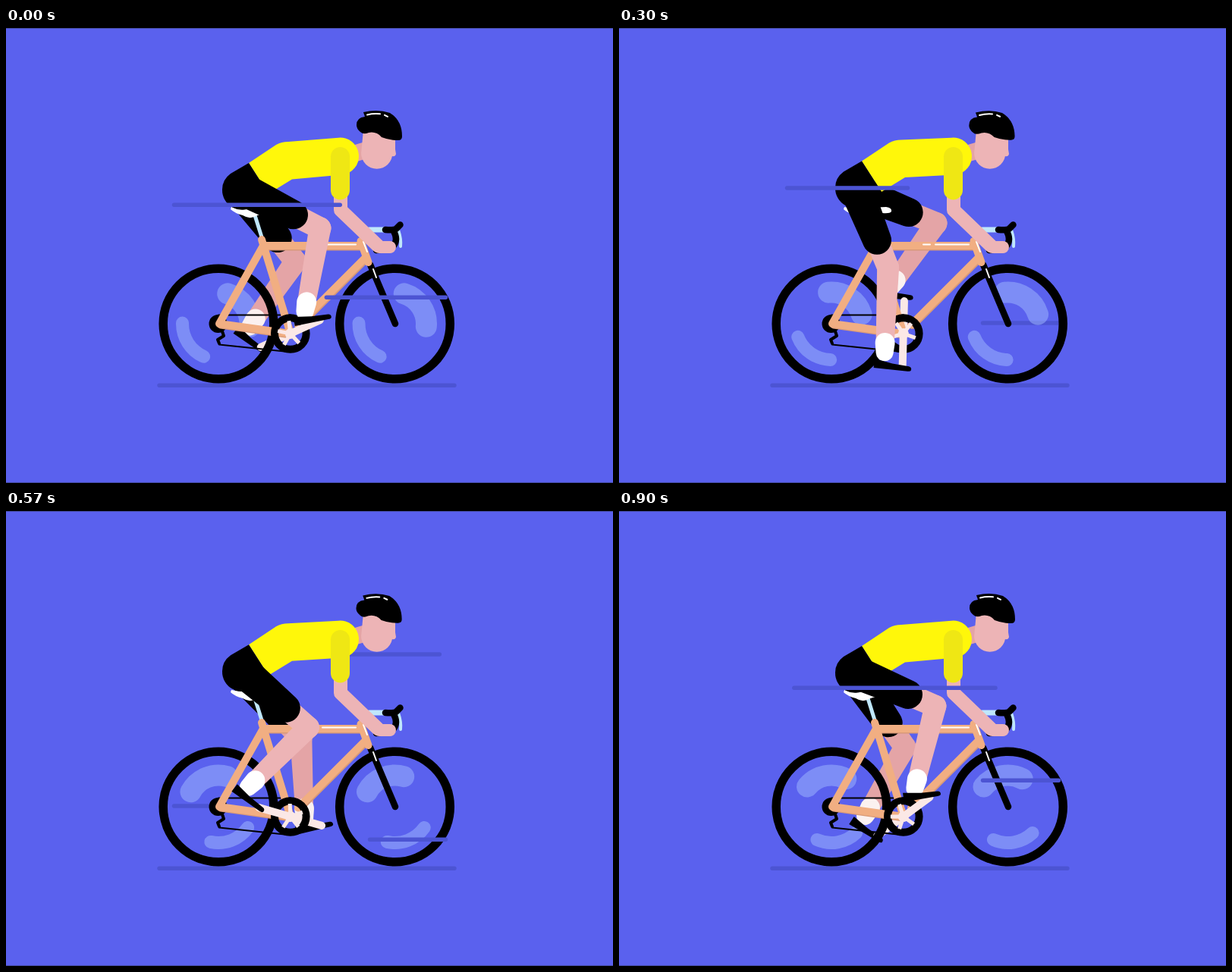
These frames come from a looping animation (800x600 px, 0.93 s). An HTML page:

```html
<!DOCTYPE html>
<html lang="en">
<head>
<meta charset="utf-8">
<title>Cyclist</title>
<style>
html, body { margin: 0; width: 100%; height: 100%; overflow: hidden; background: #5a61ee; }
svg { display: block; width: 800px; height: 600px; }
.ln { fill: none; stroke-linecap: round; stroke-linejoin: round; }
.skin { fill: #edb4b6; }
.far .skin { fill: #e4a4a6; }
.sock { fill: #fff; }
.far .sock { fill: #fbf1f0; }
.wind { stroke: #4c54d3; stroke-width: 5.4; }
.crank { stroke: #fbe8e6; stroke-width: 10; }
.tube { stroke: #f1ae82; stroke-width: 10; }
.shade { stroke: #d99a78; stroke-width: 10; }
.pale { stroke: #bfe7fb; }
.white { stroke: #fff; stroke-width: 2; }
.black { stroke: #000; }
.shine { stroke: #a0b9ff; stroke-opacity: .5; }
</style>
</head>
<body>
<svg viewBox="0 0 800 600">
  <rect width="800" height="600" fill="#5a61ee"/>
  <path d="M0 .5H800M0 599.5H800" stroke="#424a9e"/>
  <path class="ln wind" d="M202 471.3H591"/>
  <g id="back"></g>
  <g id="shines"></g>
  <g id="farLeg" class="far"></g>
  <path id="farCrank" class="ln crank"/>

  <g class="ln black">
    <circle cx="280" cy="390" r="72.8" stroke-width="11.5"/>
    <circle cx="512.5" cy="390" r="72.8" stroke-width="11.5"/>
    <path d="M280 378.5H375M281 417.5L372 427" stroke-width="2"/>
    <path d="M284 397L287 406L279 411L281 416" stroke-width="4"/>
    <path d="M480 312L513 390" stroke-width="8.5"/>
  </g>
  <circle cx="279.5" cy="390" r="12"/>
  <path class="ln white" d="M484 318L488 329"/>

  <path class="ln pale" d="M328 247L338 279" stroke-width="5"/>
  <path d="M297 236Q314 240 330 237L352 236Q360 237 359 242Q357 245 347 244Q334 245 327 249Q320 252 312 247Q301 244 296 239Z" fill="#fff"/>
  <path class="ln shade" d="M283 391.5L372 404M387 392L474 305M342 288.5H468"/>
  <path class="ln tube" d="M281 390L371 402.5M385 391.5L473 303.5M341 287H468M339 287L281 390M337 279L374 400M467.5 281L477.5 309"/>
  <path class="ln white" d="M401 285.5H410M417 285.5H461M471 282L476 295"/>

  <path class="ln pale" d="M479 266H499" stroke-width="7"/>
  <path class="ln pale" d="M517.5 268Q521 278 520 288" stroke-width="4"/>
  <path class="ln black" d="M500 266Q510 267 514 265L519.5 259.5M511 268Q517 279 511 287Q503 293 488 293" stroke-width="8.5"/>

  <circle class="ln black" cx="374.8" cy="403" r="20.8" stroke-width="10"/>
  <g id="spider"></g>
  <path id="nearCrank" class="ln crank"/>

  <path d="M451 168L478 160" stroke="#e4a4a6" stroke-width="22"/>
  <path class="skin" d="M471 134L513 142V160L514 166Q513 170 509 169A20.5 20.5 0 0 1 468.5 161Z"/>
  <g id="helmet">
    <path d="M462 128Q462 118 473 117L471 111Q490 106.5 506 112Q522 122 522 143Q522 148 517 148Q505 148 495 144Q488 136 478 138Q471 141 467 137Q462 133 462 128Z"/>
    <path class="ln white" d="M476 114.5Q484 112.5 493 113.3M499 114.8L503 116.8"/>
  </g>
  <path id="shirt" fill="#fff70a"/>
  <g id="nearLeg"></g>
  <path id="pelvis"/>

  <path class="ln" d="M441 222V240L490 287" stroke="#edb4b6" stroke-width="18"/>
  <path class="ln" d="M492 289H506" stroke="#edb4b6" stroke-width="16"/>
  <rect x="428" y="157" width="25" height="69.5" rx="12.5" fill="#efe714"/>
  <g id="front"></g>
</svg>
<script>
const LOOP = 930, TAU = Math.PI * 2, RAD = Math.PI / 180;
const HUB = [374.8, 403], THIGH = 114;
const get = id => document.getElementById(id);

function add(parent, tag, attrs) {
  const el = document.createElementNS('http://www.w3.org/2000/svg', tag);
  for (const k in attrs) el.setAttribute(k, attrs[k]);
  return parent.appendChild(el);
}
const setPath = (el, d) => el.setAttribute('d', d);
const polar = ([x, y], r, a) => [x + r * Math.cos(a), y + r * Math.sin(a)];
const mix = (a, b, k) => [a[0] + (b[0] - a[0]) * k, a[1] + (b[1] - a[1]) * k];
const str = p => p.map(v => v.toFixed(2)).join(' ');

// Outline around two circles
function capsule(a, ra, b, rb) {
  const dx = b[0] - a[0], dy = b[1] - a[1];
  const dir = Math.atan2(dy, dx), o = Math.acos((ra - rb) / Math.hypot(dx, dy));
  return `M${str(polar(a, ra, dir + o))}A${ra} ${ra} 0 ${+(ra > rb)} 1 ${str(polar(a, ra, dir - o))}` +
    `L${str(polar(b, rb, dir - o))}A${rb} ${rb} 0 ${+(rb > ra)} 1 ${str(polar(b, rb, dir + o))}Z`;
}

const bob = t => 1.7 * Math.cos(TAU * (t + 15) / LOOP * 2);
const crankAngle = t => -25 * RAD + TAU * t / LOOP;

function footTilt(t) {
  const f = TAU * (t - 510) / LOOP;
  return 8.7 + 25 * Math.cos(f) + 3.5 * Math.sin(f) + 3.3 * Math.cos(2 * f);
}

function makeLeg(id, hipY, shinLen) {
  const g = get(id);
  const part = cls => add(g, 'path', { class: cls });
  const thigh = part('skin'), shin = part('skin'), shorts = part(''), sock = part('sock'), shoe = part('');
  setPath(shoe, 'M-37.5 -10L-14 -6L8 -4.5Q12 -4 11.5 0Q11 2 7 2H-38Z');
  return t => {
    const hip = [312, hipY + bob(t)];
    const turn = crankAngle(t), pedal = polar(HUB, 47, turn);
    const tilt = footTilt(t), c = Math.cos(tilt * RAD), s = Math.sin(tilt * RAD);
    const lift = 6 + 3.5 * Math.sin(turn);
    const ankle = [pedal[0] - 25 * c + lift * s, pedal[1] - 25 * s - lift * c];
    const dx = ankle[0] - hip[0], dy = ankle[1] - hip[1];
    const d = Math.min(Math.hypot(dx, dy), THIGH + shinLen - .1);
    const bend = Math.acos((THIGH ** 2 + d * d - shinLen ** 2) / (2 * THIGH * d));
    const knee = polar(hip, THIGH, Math.atan2(dy, dx) - bend);
    const hem = mix(hip, knee, 75 / THIGH);
    const cuff = mix(ankle, knee, 23 / shinLen);
    setPath(thigh, capsule(hem, 15, knee, 14.5));
    setPath(shin, capsule(knee, 14.5, cuff, 12));
    setPath(shorts, capsule(hip, 22, hem, 19));
    setPath(sock, capsule(cuff, 13, mix(ankle, knee, 10 / shinLen), 11.5));
    shoe.setAttribute('transform', `translate(${str(pedal)}) rotate(${tilt.toFixed(2)})`);
  };
}

// Curved reflections in both wheels
function arc(r, from, to) {
  const o = [0, 0];
  return `M${str(polar(o, r, from * RAD))}A${r} ${r} 0 0 1 ${str(polar(o, r, to * RAD))}`;
}
const wheels = [280, 512.5].map(x => {
  const g = add(get('shines'), 'g', { transform: `translate(${x} 390)` });
  const spin = add(g, 'g', { class: 'ln shine' });
  add(spin, 'path', { d: arc(41.5, -74, 4), 'stroke-width': 28 });
  add(spin, 'path', { d: arc(47.5, 113, 180), 'stroke-width': 17 });
  return spin;
});

const spider = get('spider');
for (let i = 0; i < 5; i++)
  add(spider, 'path', { d: 'M0 0H17', transform: `rotate(${i * 72})`, stroke: '#fbe8e6', 'stroke-width': 5 });
add(spider, 'circle', { r: 7, fill: '#fbe8e6' });

// Wind streaks: [y, start time, layer]
const streaks = [
  [211, 30, 'front'], [389, 240, 'back'], [189, 420, 'back'],
  [433.3, 510, 'front'], [233.3, 690, 'front'], [355.3, 840, 'front']
].map(([y, start, layer]) => ({ y, start, el: add(get(layer), 'path', { class: 'ln wind' }) }));

function ease(x) {
  x = Math.max(0, Math.min(1, x));
  return x * x * (3 - 2 * x);
}

function drawStreak({ y, start, el }, t) {
  const age = (t - start + 33 + LOOP) % LOOP;
  const left = 579.5 - 358 * ease(age / 270);
  const right = 579.5 - 358 * ease((age - 160) / 268);
  setPath(el, right - left > 2 ? `M${left.toFixed(2)} ${y}H${right.toFixed(2)}` : '');
}

function drawBody(t) {
  const b = bob(t), w = 176.3 + b;
  setPath(get('shirt'), `M320 ${w}L356 ${w - 24}Q363 ${w - 28} 372 ${w - 28}L438 144.7` +
    `A24 24 0 0 1 443 193.5L377 ${w + 21.5}L346 ${w + 40.5}Z`);
  setPath(get('pelvis'), `M320 ${w}L346 ${w + 40.5}L326 ${w + 57}A26 26 0 0 1 285 ${w + 35}` +
    `Q285 ${w + 22} 296 ${w + 14}Z`);
  get('helmet').setAttribute('transform', `rotate(${(b - 1.7) * .45} 500 165)`);
}

const nearLeg = makeLeg('nearLeg', 211, 122), farLeg = makeLeg('farLeg', 216, 115);

function draw(t) {
  const a = crankAngle(t);
  const arm = ang => `M${str(HUB)}L${str(polar(HUB, 43, ang))}`;
  setPath(get('nearCrank'), arm(a));
  setPath(get('farCrank'), arm(a + Math.PI));
  spider.setAttribute('transform', `translate(${HUB}) rotate(${a / RAD})`);
  for (const w of wheels) w.setAttribute('transform', `rotate(${t * 1.125})`);
  nearLeg(t);
  farLeg(t + LOOP / 2);
  drawBody(t);
  for (const s of streaks) drawStreak(s, t);
}

const begin = performance.now();
function tick() {
  draw((performance.now() - begin) % LOOP);
  requestAnimationFrame(tick);
}
tick();
</script>
</body>
</html>
```
